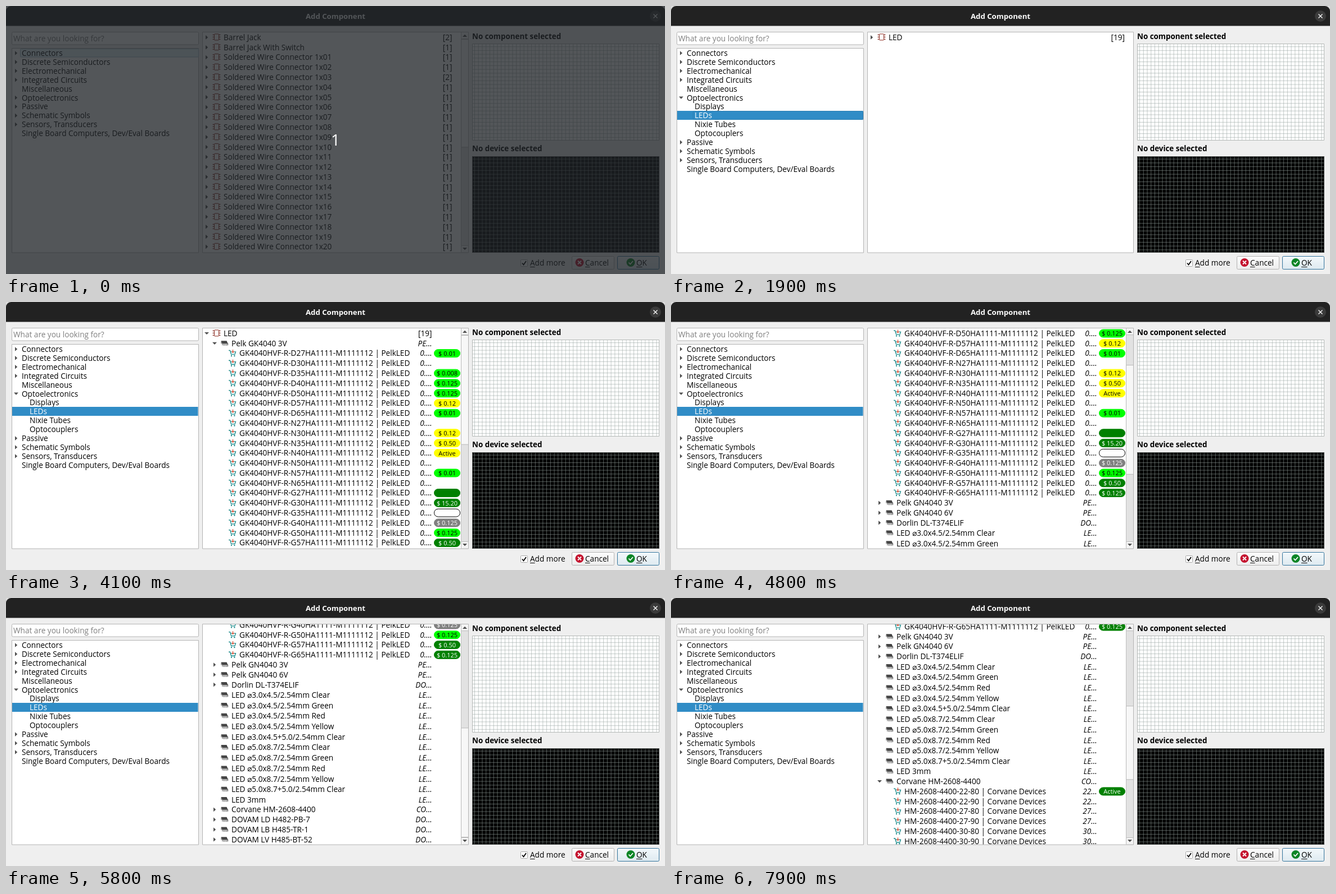
These frames come from a looping animation (1172 px wide and 478 px high, 8000 ms). An HTML page with a canvas:

```html
<!DOCTYPE html>
<html lang="en">
<head>
<meta charset="utf-8">
<title>Add Component</title>
<style>
html, body { margin: 0; width: 100%; height: 100%; overflow: hidden; background: #efefef; }
canvas { display: block; }
</style>
</head>
<body>
<canvas id="stage" width="1172" height="478"></canvas>
<script>
const g = document.getElementById('stage').getContext('2d');
const LOOP = 8000, UNIT = .936;
const ROW = 19 * UNIT, TALL = 20 * UNIT, TREE_ROW = 17 * UNIT, GRID = 7.2 * UNIT;
const TOP = 47, VIEW = 392.6;
const FAMILY = '"Open Sans", "DejaVu Sans", sans-serif';

// ---- drawing helpers ----
function text(s, x, y, { color = '#000', size = 13.6, style = '', align = 'left' } = {}) {
  g.font = `${style} ${size}px ${FAMILY}`;
  g.fillStyle = color;
  g.textAlign = align;
  g.fillText(s, x, y);
}
function box(x, y, w, h, fill, stroke, r = 0) {
  g.beginPath();
  g.roundRect(x, y, w, h, r);
  if (fill) { g.fillStyle = fill; g.fill(); }
  if (stroke) { g.lineWidth = 1; g.strokeStyle = stroke; g.stroke(); }
}
function disc(x, y, r, fill) {
  g.beginPath();
  g.arc(x, y, r, 0, 7);
  g.fillStyle = fill;
  g.fill();
}
function line(d, color, width = 1) {
  g.strokeStyle = color;
  g.lineWidth = width;
  g.stroke(new Path2D(d));
}
function shape(d, color) {
  g.fillStyle = color;
  g.fill(new Path2D(d));
}
function at(x, y, draw) {
  g.save();
  g.translate(x, y);
  draw();
  g.restore();
}
function arrow(x, y, open) {
  at(x, y, () => shape(open ? 'M-4 -2H4L0 2.2Z' : 'M-2 -3.8V3.8L2.2 0Z', '#505050'));
}
function label(s, x, y) {
  text(s, x, y);
  const w = g.measureText(s[0]).width;
  line(`M${x} ${y + 2.5}h${w}`, '#000');
}

// ---- list icons, one per level ----
const icons = [
  () => {
    line('M-7 -4h3M-7 0h3M-7 4h3M4 -4h3M4 0h3M4 4h3', '#8c3a30', 1.2);
    box(-4, -5.5, 8, 11, '#fff', '#8c2a20', 1);
  },
  () => {
    shape('M-6 -4H4L6 1H-4Z', '#444');
    line('M-5.5 -3V1M-3.5 0V4M-1 1V4.5M1.5 1V4.5M4 1V4.5M6 0V4', '#555', 1.1);
  },
  () => {
    line('M-6.5 -4.5H-4L-2 2.5H4.5L6 -2H3M-3.5 -2H-1', '#1d8c8c', 1.3);
    disc(-1.5, 5, 1.2, '#1d8c8c');
    disc(3.8, 5, 1.2, '#1d8c8c');
    line('M1 -6V-1M-1 -2.8L1 -.8L3 -2.8', '#d4482e', 1.2);
  }
];

// ---- list contents ----
const row = (level, name, info, open, pill = '') =>
  ({ level, name, info, open, pill, h: name.includes('⌀') ? TALL : ROW });

const connectors = ['Barrel Jack', 'Barrel Jack With Switch'];
for (let i = 1; i <= 40; i++) connectors.push('Soldered Wire Connector 1x' + String(i).padStart(2, '0'));
const connectorRows = connectors.map((n, i) => row(0, n, i === 0 || i === 4 ? '[2]' : '[1]', false));

const temps = [27, 30, 35, 40, 50, 57, 65];
const pills = ('L$ 0.01,,L$ 0.008,L$ 0.125,L$ 0.125,Y$ 0.12,L$ 0.01,,Y$ 0.12,Y$ 0.50,YActive,,L$ 0.01,,' +
  'G,G$ 15.20,W,S$ 0.125,L$ 0.125,G$ 0.50,G$ 0.125').split(',');
const parts = [...'DNG'].flatMap(c => temps.map(k => `GK4040HVF-R-${c}${k}HA1111-M1111112 | PelkLED`));
const partRows = parts.map((n, i) => row(2, n, '0.…', undefined, pills[i]));

const whites = [22, 27, 30, 35, 40, 50, 57, 60, 65, 70].flatMap(k => [80, 90].map(q =>
  row(2, `HM-2608-4400-${k}-${q} | Corvane Devices`, k + '…')));

const plain = ['3.0x4.5', '5.0x8.7'].flatMap(s => [
  ...['Clear', 'Green', 'Red', 'Yellow'].map(c => `LED ⌀${s}/2.54mm ${c}`),
  `LED ⌀${s}+5.0/2.54mm Clear`
]).concat('LED 3mm').map(n => row(1, n, 'LE…'));

function ledRows(t) {
  const head = row(0, 'LED', '[19]', t >= 2900);
  if (!head.open) return [head];
  const first = t >= 3600, second = t >= 7200;
  whites[0].pill = t >= 7500 ? 'GActive' : '';
  return [
    head,
    row(1, 'Pelk GK4040 3V', 'PE…', first), ...(first ? partRows : []),
    row(1, 'Pelk GN4040 3V', 'PE…', false),
    row(1, 'Pelk GN4040 6V', 'PE…', false),
    row(1, 'Dorlin DL-T374ELIF', 'DO…', false),
    ...plain,
    row(1, 'Corvane HM-2608-4400', 'CO…', second), ...(second ? whites : []),
    row(1, 'DOVAM LD H482-PB-7', 'DO…', false),
    row(1, 'DOVAM LB H485-TR-1', 'DO…', false),
    row(1, 'DOVAM LV H485-BT-52', 'DO…', false)
  ];
}

// Wheel steps: time, then rows scrolled
const wheel = [[4600, 3], [4800, 6], [4900, 8], [5100, 10], [5200, 12], [5700, 15], [5800, 19.45], [7900, 22.28]];
const scrollAt = t => wheel.reduce((y, [start, n]) => t >= start ? n * ROW : y, 0);

const pillStyle = {
  L: ['#00ff00', '#000'], Y: ['#ffff00', '#000'], G: ['#008000', '#fff'],
  S: ['#808080', '#fff'], W: ['#fff', '#000']
};
function drawPill(pill, c) {
  const [fill, ink] = pillStyle[pill[0]];
  box(761.5, c - 6.9, 46, 14, fill, pill[0] === 'W' ? '#000' : fill, 7);
  text(pill.slice(1), 784.5, c + 4.3, { size: 11, color: ink, align: 'center' });
}

function scrollbar(total, offset) {
  const track = 368, y = 59 + offset / total * track;
  box(809.5, TOP - .5, 13, VIEW + 1, '#e2e2e2', '#bdbdbd');
  box(809.5, TOP - .5, 13, 12, '#f4f4f4', '#bdbdbd');
  box(809.5, 427.5, 13, 12, '#f4f4f4', '#bdbdbd');
  box(809.5, y + .5, 13, VIEW / total * track - 1, '#f7f7f7', '#b8b8b8');
  at(816, 53, () => shape('M-4 2H4L0 -2.2Z', '#505050'));
  at(816, 433, () => shape('M-4 -2H4L0 2.2Z', '#505050'));
}

function drawList(t) {
  box(349.5, 46.5, 473, 393.5, '#fff', '#b4b4b4');
  const rows = t < 1900 ? connectorRows : ledRows(t);
  const total = rows.reduce((sum, r) => sum + r.h, 0);
  const offset = scrollAt(t), bar = total > VIEW;
  const right = !bar ? 807 : t < 4100 ? 793.5 : 757.5;
  g.save();
  g.beginPath();
  g.rect(350, TOP, 472, VIEW);
  g.clip();
  let y = TOP - offset;
  for (const r of rows) {
    const c = y + r.h / 2, x = 14 * r.level;
    y += r.h;
    if (y < TOP || c - r.h > TOP + VIEW) continue;
    if (r.open !== undefined) arrow(357 + x, c, r.open);
    at(374.5 + x, c - .5, icons[r.level]);
    text(r.name, 387 + x, c + 5);
    text(r.info, right, c + 5, { align: 'right', style: r.level ? 'italic' : '' });
    if (r.pill && t >= 4100) drawPill(r.pill, c);
  }
  if (bar) scrollbar(total, offset);
  g.restore();
}

// ---- category tree; a leading + marks a branch ----
const tree = ['+Connectors', '+Discrete Semiconductors', '+Electromechanical', '+Integrated Circuits',
  'Miscellaneous', '+Optoelectronics', '+Passive', '+Schematic Symbols', '+Sensors, Transducers',
  'Single Board Computers, Dev/Eval Boards'];
const opto = ['  Displays', '  LEDs', '  Nixie Tubes', '  Optocouplers'];

function drawTree(t) {
  box(10.5, 75.5, 332, 364.5, '#fff', '#b4b4b4');
  const open = t >= 1000;
  const items = open ? [...tree.slice(0, 6), ...opto, ...tree.slice(6)] : tree;
  if (t < 1900) box(25.5, 76.5, 317, 14.5, '#e2f1f9', '#a5bfce', 1);
  items.forEach((s, i) => {
    const c = 84 + i * TREE_ROW, name = s.replace(/^[+ ]+/, '');
    const chosen = name === 'LEDs' && t >= 1900;
    if (chosen) {
      box(11, 187, 330.5, 16, '#308cc6');
      if (t < 2900) box(39.5, 187.5, 302, 15, null, '#2b7eb2', 1);
    }
    if (s[0] === '+') arrow(18, c, open && name === 'Optoelectronics');
    text(name, s[0] === ' ' ? 42 : 28, c + 5, { color: chosen ? '#fff' : '#000' });
  });
}

// The grid spreads out from the middle of the panel
function preview(y, h, fill, grid, border) {
  const x = 829, w = 332.5, cx = x + w / 2, cy = y + h / 2;
  box(x, y, w, h, fill);
  let d = `M${cx} ${y}v${h}M${x} ${cy}h${w}`;
  for (let s = GRID; s < w / 2; s += GRID) {
    d += `M${cx - s} ${y}v${h}M${cx + s} ${y}v${h}`;
    if (s < h / 2) d += `M${x} ${cy - s}h${w}M${x} ${cy + s}h${w}`;
  }
  line(d, grid);
  box(x + .5, y + .5, w - .5, h - 1, null, border);
}

function button(x, w, border, top, bottom) {
  const fill = g.createLinearGradient(0, 446, 0, 470);
  fill.addColorStop(0, top);
  fill.addColorStop(1, bottom);
  box(x, 446.5, w, 23, fill, border, 2);
}

function drawWindow() {
  box(0, 0, 1172, 478, '#dcdcdc');
  box(0, 30, 1172, 448, '#efefef');
  box(0, 0, 1172, 35.5, '#222', null, [9, 9, 0, 0]);
  text('Add Component', 586, 23.3, { color: '#fff', size: 13.2, style: 'bold', align: 'center' });
  disc(1155, 18, 10, '#3b3b3b');
  line('M1151.5 14.5l7 7M1158.5 14.5l-7 7', '#fff', 1.3);

  box(10.5, 46.5, 332, 22.5, '#fff', '#b4b4b4', 2);
  text('What are you looking for?', 13, 62.5, { color: '#7f7f7f' });

  text('No component selected', 829, 59, { size: 13.4, style: 'bold' });
  preview(67, 173, '#fff', 'rgba(150,162,158,.55)', '#b4b8b6');
  text('No device selected', 829, 259, { size: 13.4, style: 'bold' });
  preview(268, 172, '#000', 'rgba(150,162,158,.55)', '#4c504e');

  box(915.5, 452.5, 12, 12, '#fff', '#a8a8a8', 1);
  line('M918 458.5l2.5 3L925 455', '#000', 1.8);
  label('Add more', 932, 463);

  button(1006.5, 75, '#b2b2b2', '#fcfcfc', '#ededed');
  disc(1020, 457.5, 7.5, '#c4122e');
  line('M1017 454.5l6 6M1023 454.5l-6 6', '#fff', 1.8);
  label('Cancel', 1030, 463);

  button(1087.5, 74, '#33749c', '#f4f9fc', '#dde9f0');
  disc(1111, 457.5, 7.5, '#0c8526');
  line('M1107.5 457.5l2.7 3L1115 455', '#fff', 1.8);
  label('OK', 1121, 463);
}

function draw(t) {
  drawWindow();
  drawTree(t);
  drawList(t);
  if (t < 100) {
    box(0, 0, 1172, 478, 'rgba(32,36,40,.77)');
    text('1', 586, 249, { color: '#fff', size: 28, align: 'center' });
  }
}

function tick(now) {
  draw(now % LOOP);
  requestAnimationFrame(tick);
}
draw(0);
requestAnimationFrame(tick);
</script>
</body>
</html>
```
